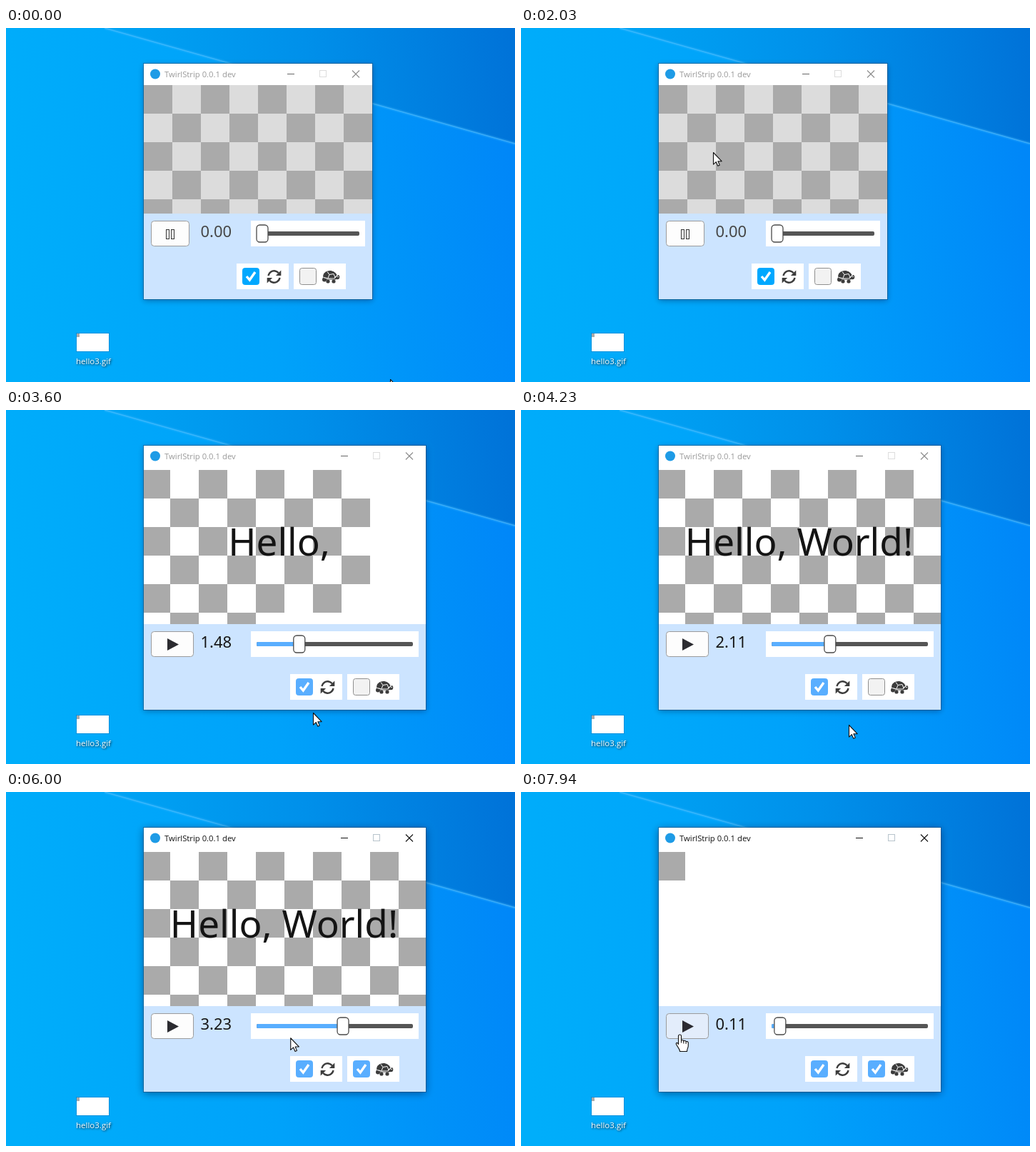
An HTML page with a canvas for the animation above (8000 ms loop, 713 px wide and 496 px high).

```html
<!DOCTYPE html>
<html lang="en">
<head>
<meta charset="utf-8">
<title>Desktop clip player</title>
<style>
html, body { margin: 0; width: 100%; height: 100%; overflow: hidden; background: #00a4f8; }
canvas { display: block; }
</style>
</head>
<body>
<canvas id="stage" width="713" height="496"></canvas>
<script>
const ctx = document.getElementById('stage').getContext('2d');
const LOOP = 8000;
const OPEN = 2120, FOCUS = 5060, SLOW = 5133, SEEK = 6400, RESUME = 7500;
const SLOW_RATE = 0.25, CLIP_LENGTH = 5.8;
const SANS = '"Noto Sans", "Open Sans", sans-serif';
const UI = '"Open Sans", "Noto Sans", sans-serif';

// Pointer stops: time, x, y, eased
const STOPS = [
  [40, 538, 492, 0], [870, 100, 420, 1],
  [1220, 100, 420, 0], [1990, 269, 174, 1],
  [2110, 269, 174, 0], [2750, 354, 344, 0], [3600, 430, 424, 0],
  [3780, 452, 438, 0], [3900, 459, 441, 0],
  [4640, 459, 441, 0], [5010, 496, 388, 1],
  [5500, 496, 388, 0], [6300, 353, 324, 1],
  [6680, 353, 324, 0], [7170, 222, 340, 1]
];
const PRESSES = [[1020, 1990], [FOCUS, 5140], [SEEK, 6640], [7400, RESUME]];

const ARROW = new Path2D('M0 0V16.6L3.8 13.2L6.3 18.8L8.8 17.6L6.4 12.2H11.6Z');
const HAND = new Path2D('M-2 1.5A2 2 0 0 1 2 1.5V8C2 6.5 5 6.5 5.3 8.5C6 7.3 8.4 7.5 8.6 9.5' +
  'C9.5 8.5 11.8 9 11.8 11V15C11.8 18 10 19 10 23H0C0 19 -4 16 -5.2 12.5C-5.5 10.5 -3 10 -2 13Z');

const smooth = k => k * k * (3 - 2 * k);
const inside = (p, x, y, w, h) => p.x >= x && p.x < x + w && p.y >= y && p.y < y + h;

function rect(x, y, w, h, fill) {
  ctx.fillStyle = fill;
  ctx.fillRect(x, y, w, h);
}

function round(x, y, w, h, r, fill, stroke, width = 1) {
  ctx.beginPath();
  ctx.roundRect(x, y, w, h, r);
  if (fill) { ctx.fillStyle = fill; ctx.fill(); }
  if (stroke) { ctx.strokeStyle = stroke; ctx.lineWidth = width; ctx.stroke(); }
}

function disc(x, y, r, fill) {
  ctx.fillStyle = fill;
  ctx.beginPath();
  ctx.arc(x, y, r, 0, Math.PI * 2);
  ctx.fill();
}

function line(points, color, width = 1) {
  ctx.strokeStyle = color;
  ctx.lineWidth = width;
  ctx.beginPath();
  points.forEach(([x, y]) => ctx.lineTo(x, y));
  ctx.stroke();
}

function poly(points, fill) {
  ctx.fillStyle = fill;
  ctx.beginPath();
  points.forEach(([x, y]) => ctx.lineTo(x, y));
  ctx.fill();
}

function text(str, x, y, font, fill, align = 'left') {
  ctx.font = font;
  ctx.textAlign = align;
  ctx.fillStyle = fill;
  ctx.fillText(str, x, y);
}

function gradient(x0, y0, x1, y1, ...colors) {
  const g = ctx.createLinearGradient(x0, y0, x1, y1);
  colors.forEach((c, i) => g.addColorStop(i / (colors.length - 1), c));
  return g;
}

function pointerAt(t) {
  let a = STOPS[0];
  for (const b of STOPS) {
    if (t < b[0]) {
      let k = Math.max(0, (t - a[0]) / (b[0] - a[0] || 1));
      if (b[3]) k = smooth(k);
      return { x: a[1] + (b[1] - a[1]) * k, y: a[2] + (b[2] - a[2]) * k };
    }
    a = b;
  }
  return { x: a[1], y: a[2] };
}

function clipTime(t) {
  if (t < OPEN) return 0;
  if (t < SLOW) return (t - OPEN) / 1000;
  if (t < SEEK) return (SLOW - OPEN + (t - SLOW) * SLOW_RATE) / 1000;
  return Math.max(0, t - RESUME) * SLOW_RATE / 1000;
}

function desktop(t, p) {
  rect(0, 0, 713, 496, gradient(0, 330, 713, 230, '#00aefa', '#00a2fa', '#0087f8'));
  poly([[0, 0], [138, 0], [713, 162], [713, 0]],
    gradient(130, 60, 713, 0, '#00a5f5', '#0090ea', '#0072d8'));
  line([[138, 0], [713, 162]], 'rgba(60,180,255,0.22)', 5);
  line([[138, 0], [713, 162]], 'rgba(90,195,255,0.6)', 1.4);

  if (t < 1330 && inside(p, 73, 406, 99, 70))
    round(73.5, 406.5, 98, 69, 0, 'rgba(255,255,255,0.17)', 'rgba(255,255,255,0.3)');
  rect(98, 427, 47, 27, 'rgba(0,70,130,0.25)');
  rect(99, 428, 45, 25, '#fff');
  rect(99, 428, 4, 5, '#aaa');
  ctx.save();
  ctx.shadowColor = 'rgba(0,0,0,0.85)';
  ctx.shadowBlur = 3;
  ctx.shadowOffsetX = ctx.shadowOffsetY = 1;
  text('hello3.gif', 122.5, 471, '11.5px ' + UI, '#fff', 'center');
  ctx.restore();
}

function titleBar(right, focused) {
  const ink = focused ? '#111' : '#8c8c8c';
  disc(209, 64.5, 7, '#1e9be6');
  text('TwirlStrip 0.0.1 dev', 222, 69, '11.3px ' + UI, focused ? '#111' : '#999');
  line([[right - 119, 64.5], [right - 109, 64.5]], focused ? ink : '#666');
  ctx.strokeStyle = focused ? '#b8c4cc' : '#ddd';
  ctx.strokeRect(right - 73.5, 59.5, 9, 9);
  const x = right - 28;
  line([[x, 59.5], [x + 10, 69.5]], ink, 1.1);
  line([[x, 69.5], [x + 10, 59.5]], ink, 1.1);
}

function playButton(y, playing, hover) {
  const w = playing ? 60 : 54;
  round(203.5, y + 0.5, w - 1, 35, 4, hover ? '#e3edfb' : '#fdfdfd', '#9b9b9b');
  if (playing) {
    poly([[226, y + 10], [242, y + 18.5], [226, y + 27]], '#2b2b30');
  } else {
    ctx.strokeStyle = '#333';
    ctx.lineWidth = 1;
    for (const x of [224.5, 231.5]) ctx.strokeRect(x, y + 12.5, 4, 13);
  }
}

function slider(y, right, time) {
  rect(343, y, right - 353, 36, '#fff');
  const end = right - 18, x = 359 + (end - 367) * time / CLIP_LENGTH;
  round(351, y + 15, end - 351, 6, 2, '#555');
  if (time > 0) round(351, y + 15, x - 351, 6, 2, '#59aeff');
  round(x - 8, y + 6, 16, 24, 4.5, '#fff', '#4a4a4a', 1.3);
}

function checkBox(x, y, on, color) {
  rect(x, y, 73, 36, '#fff');
  round(x + 8.5, y + 6.5, 23, 23, 3, on ? color : '#f2f2f2', on ? color : '#8f8f8f');
  if (on) line([[x + 14, y + 18], [x + 18.3, y + 23], [x + 26, y + 12]], '#fff', 3.4);
}

function loopIcon(x, y) {
  ctx.save();
  ctx.translate(x, y);
  for (let i = 0; i < 2; i++) {
    ctx.strokeStyle = '#3c3c3c';
    ctx.lineWidth = 2.5;
    ctx.beginPath();
    ctx.arc(0, 0, 8.2, Math.PI * 1.06, Math.PI * 1.78);
    ctx.stroke();
    poly([[9.8, -9], [9.8, -1.6], [2.4, -1.6]], '#3c3c3c');
    ctx.rotate(Math.PI);
  }
  ctx.restore();
}

function turtleIcon(x, y) {
  const ink = '#3c3c3c';
  ctx.save();
  ctx.translate(x, y);
  ctx.fillStyle = ink;
  ctx.beginPath();
  ctx.ellipse(-1, 0, 10, 8.5, 0.15, Math.PI, Math.PI * 2);
  ctx.lineTo(7, 4);
  ctx.lineTo(-10, 4);
  ctx.fill();
  disc(9, 0.5, 3.3, ink);
  disc(-9, 4, 3, ink);
  disc(-4, 6.5, 2.6, ink);
  disc(4, 6.5, 2.6, ink);
  line([[-10, 1], [-4, 2.6], [5, 2.2], [10, -3]], '#fff', 1.1);
  line([[-5, -7], [-2, -3], [-4, 2]], '#fff', 1);
  line([[-2, -3], [4, -4], [6, 1]], '#fff', 1);
  disc(10, 0, 0.8, '#fff');
  ctx.restore();
}

function emptyView() {
  for (let r = 0; r < 5; r++)
    for (let c = 0; c < 8; c++)
      rect(193 + c * 40, 80 + r * 40, 40, Math.min(40, 180 - r * 40), (r + c) % 2 ? '#dcdcdc' : '#aaa');
}

// One letter and one column of squares per tenth of a second
function clipView(time) {
  const step = Math.floor((time - 0.77) * 10);
  ctx.save();
  ctx.beginPath();
  ctx.rect(193, 84, 395, 216);
  ctx.clip();
  for (let r = 0; r < 6; r++)
    for (let c = r % 2; c < 10; c += 2)
      if (c + (r === 5 ? 3 : 0) <= step || r + c === 0) rect(190 + c * 40, 84 + r * 40, 40, 40, '#aaa');
  if (step > 0) {
    const str = 'Hello, World!'.slice(0, step);
    ctx.font = '53px ' + SANS;
    const w = ctx.measureText(str).width;
    text(str, 389.5 - w / 2, 204, ctx.font, '#141414');
  }
  ctx.restore();
}

function playerWindow(t, p) {
  const open = t >= OPEN, focused = t >= FOCUS;
  const right = open ? 588 : 513, bottom = open ? 420 : 380;
  const panel = bottom - 120, row = panel + 10, low = panel + 70;
  const time = clipTime(t);
  const playing = open && (t < SEEK || t >= RESUME);
  const blue = open ? '#59aeff' : '#00a8ff';

  ctx.save();
  ctx.shadowColor = focused ? 'rgba(0,20,60,0.55)' : 'rgba(0,20,60,0.4)';
  ctx.shadowBlur = focused ? 11 : 8;
  ctx.shadowOffsetY = 2;
  rect(193, 50, right - 193, bottom - 50, '#fff');
  ctx.restore();
  ctx.strokeStyle = 'rgba(20,70,110,0.5)';
  ctx.lineWidth = 1;
  ctx.strokeRect(192.5, 49.5, right - 192, bottom - 49);

  titleBar(right, focused);
  if (open) clipView(time); else emptyView();
  rect(193, panel, right - 193, 120, '#cce4ff');
  playButton(row, playing, open && inside(p, 203, row, 60, 36));
  text(time.toFixed(2), 272.5, row + 23, '22px ' + SANS, open ? '#161616' : '#454545');
  slider(row, right, time);

  const loopX = right - 190, slowX = right - 110;
  checkBox(loopX, low, true, blue);
  loopIcon(loopX + 52.5, low + 18.5);
  const hover = inside(p, slowX, low, 73, 36);
  checkBox(slowX, low, t >= SLOW, hover ? '#7dcaff' : blue);
  turtleIcon(slowX + 52, low + 18.5);
}

function pointer(t, p) {
  if (PRESSES.some(([a, b]) => t >= a && t < b)) disc(p.x, p.y, 12, 'rgba(255,250,40,0.62)');
  const hand = t >= OPEN && (inside(p, 203, 310, 60, 36) || inside(p, 351, 314, 219, 28) ||
    inside(p, 406, 376, 60, 24) || inside(p, 478, 370, 73, 36));
  const shape = hand ? HAND : ARROW;
  ctx.save();
  ctx.translate(p.x + 0.5, p.y + 0.5);
  ctx.fillStyle = '#fff';
  ctx.strokeStyle = '#111';
  ctx.lineWidth = 1.1;
  ctx.lineJoin = 'round';
  ctx.fill(shape);
  ctx.stroke(shape);
  if (hand) {
    line([[5.3, 8.5], [5.3, 12]], '#111');
    line([[8.6, 9.5], [8.6, 12.5]], '#111');
    line([[2, 8], [2, 11]], '#111');
  }
  ctx.restore();
}

function draw(now) {
  const t = now % LOOP;
  const p = pointerAt(t);
  desktop(t, p);
  playerWindow(t, p);
  pointer(t, p);
}

let start;
function tick(now) {
  start ??= now;
  draw(now - start);
  requestAnimationFrame(tick);
}
draw(0);
requestAnimationFrame(tick);
</script>
</body>
</html>
```
